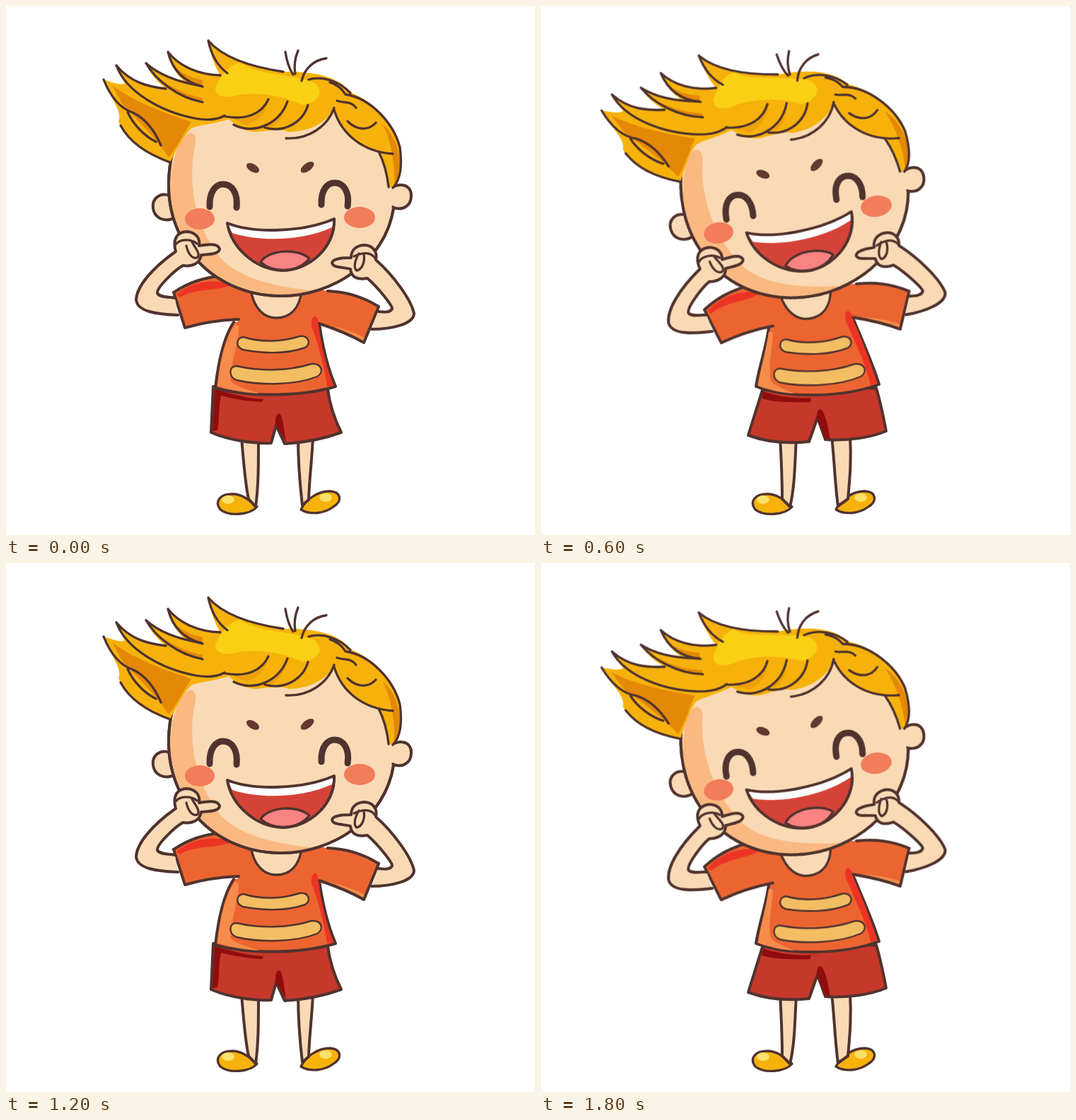
Animation, 748 px wide and 748 px high, one loop 2 s. Source, as an HTML page:

```html
<!DOCTYPE html>
<html lang="en">
<head>
<meta charset="utf-8">
<title>Happy boy</title>
<style>
html, body { margin: 0; width: 100%; height: 100%; overflow: hidden; background: #fff; }
svg { display: block; width: 100vw; height: 100vh; }
.line { fill: none; stroke: #50332e; stroke-width: 4; stroke-linecap: round; stroke-linejoin: round; }
.thin { stroke-width: 3.3; }
.fine { stroke-width: 2.4; }
.bold { stroke-width: 9; }
.flat { stroke: none; }
.skin { fill: #fadab5; }
.glow { fill: #fab981; }
.hair { fill: #f6b20b; }
.gold { fill: #fad014; }
.amber { fill: #e48806; }
.honey { fill: #eea008; }
.shirt { fill: #ec6531; }
.peach { fill: #f68b4b; }
.red { fill: #ec3425; }
.band { fill: #f3bd62; }
.shorts { fill: #c6382a; }
.wine { fill: #8f0e0d; }
.cheek { fill: #f17d5a; }
.brow { fill: #63392f; }
.tilt, .left, .right, .bands { animation: 400ms step-end infinite; }
.tilt { animation-name: tilt; }
.bands { animation-name: bands; }
.left { animation-name: left; }
.right { animation-name: right; }
@keyframes tilt {
  0% { transform: none; }
  50%, 100% { transform: translate(-67px, 67px) rotate(-9.1deg); }
}
@keyframes bands {
  0% { transform: none; }
  50%, 100% { transform: translate(-4px, 14px) rotate(-1.8deg); }
}
@keyframes left {
  0% { visibility: visible; }
  50%, 100% { visibility: hidden; }
}
@keyframes right {
  0% { visibility: hidden; }
  50%, 100% { visibility: visible; }
}
</style>
</head>
<body>
<svg viewBox="0 0 748 748">
<g class="line">
  <!-- shoes -->
  <path class="hair thin" d="M355 708C345 720 315 722 303 712C294 700 303 690 320 690C335 690 345 700 355 708Z"/>
  <path class="hair thin" d="M417 712C424 698 440 686 458 686C474 687 476 700 463 708C450 718 430 720 417 712Z"/>
  <g class="flat" fill="#fbe06a">
    <ellipse cx="314" cy="698" rx="9" ry="6"/>
    <ellipse cx="452" cy="695" rx="9" ry="6"/>
  </g>

  <!-- legs, shorts and torso, one set per lean -->
  <g class="left">
    <path class="skin" d="M333 610C336 645 338 675 343 697L353 708C357 680 357 650 357 610"/>
    <path class="skin" d="M413 610C413 645 416 680 419 706L428 698C429 665 433 640 434 608"/>
    <path class="shorts" d="M293 538L290 603C315 614 350 619 375 618L382 593L394 619C425 617 455 610 474 603C465 585 458 565 455 542Z"/>
    <path class="wine flat" d="M295 541C320 550 345 555 364 556L362 560C340 559 325 556 304 551C300 570 302 588 299 600L292 601Z"/>
    <path class="wine flat" d="M381 592C380 580 384 574 388 577C393 588 393 602 396 616Z"/>
    <path class="shirt" d="M322 447C308 468 300 505 296 540C345 554 420 552 466 538C454 510 447 478 443 449"/>
    <path class="peach flat" d="M324 450C309 470 302 505 299 537C320 544 340 547 358 548C340 542 325 538 318 531C314 515 330 480 329 450Z"/>
    <path class="red flat" d="M433 455C432 434 442 434 442 450C445 480 453 510 463 537L454 538C450 510 442 480 433 455Z"/>
  </g>
  <g class="right">
    <path class="skin" d="M338 610C340 645 341 675 341 697L352 708C359 680 359 645 361 610"/>
    <path class="skin" d="M411 608C415 645 416 680 420 707L434 697C437 665 439 640 437 608"/>
    <path class="shorts" d="M313 543L293 607C320 617 350 619 379 616L391 582L402 613C430 615 465 611 488 601C484 580 480 560 474 540Z"/>
    <path class="wine flat" d="M314 545C335 552 360 556 382 554L381 560C355 561 330 560 312 555Z"/>
    <path class="wine flat" d="M390 584C389 573 393 568 397 571C404 582 406 597 409 612L402 612Z"/>
    <path class="shirt" d="M322 455C318 485 307 515 304 538C350 556 430 553 478 535C469 505 453 470 441 441"/>
    <path class="peach flat" d="M322 461C318 488 310 515 307 537C325 544 342 547 358 548C342 541 328 536 325 529C320 510 328 480 328 459Z"/>
    <path class="red flat" d="M432 448C430 428 440 428 442 446C453 470 467 505 475 534L466 536C460 508 444 475 432 448Z"/>
  </g>

  <!-- upper shirt and neck -->
  <g class="tilt">
    <path class="shirt flat" d="M237 405C260 390 278 385 300 382L455 403C482 404 506 412 527 425L506 476C487 465 464 456 443 449L430 456L325 452L329 443C302 444 277 448 253 455Z"/>
    <path class="red flat" d="M241 408C260 391 292 384 320 394C300 404 268 398 246 412Z"/>
    <path class="red flat" d="M432 455C430 435 441 434 442 449L439 460Z"/>
    <path class="peach flat" d="M449 450C470 453 492 461 509 470L506 475C488 464 468 456 449 450Z"/>
    <path d="M329 443C302 444 277 448 253 455L237 405C260 390 278 385 300 382M455 403C482 404 506 412 527 425L506 476C487 465 464 456 443 449"/>
    <path class="skin thin" d="M346 400C350 428 365 441 382 441C400 441 414 430 418 404"/>
  </g>
  <g class="bands fine">
    <path class="band" d="M336 468C360 476 390 475 415 467C428 465 432 478 423 483C395 493 360 491 335 486C324 482 325 469 336 468Z"/>
    <path class="band" d="M326 509C360 517 400 516 432 506C447 505 450 518 440 524C410 536 360 537 326 529C314 524 315 509 326 509Z"/>
  </g>

  <g class="tilt">
    <!-- ears and face -->
    <path class="skin" d="M231 268C218 263 206 272 208 286C210 300 223 305 235 301"/>
    <path class="skin" d="M541 260C555 248 573 252 573 268C573 285 558 290 546 284"/>
    <ellipse class="skin flat" cx="389" cy="258" rx="159" ry="152"/>
    <path id="jaw" class="skin" d="M235 208C222 268 235 315 264 352C292 388 338 410 389 410C462 410 536 362 548 286"/>
    <path class="glow flat" d="M262 180C248 178 234 215 232 255C233 300 250 335 285 371C325 405 390 417 440 403C385 398 330 386 303 356C266 310 256 245 268 195C269 186 267 181 262 180Z"/>
    <path d="M235 208C222 268 235 315 264 352C292 388 338 410 389 410C462 410 536 362 548 286"/>

    <!-- hair -->
    <g class="flat">
      <path class="hair" d="M138 104C145 106 158 112 168 110L156 84C176 108 200 114 226 117C212 106 203 94 198 81C212 95 232 105 250 105C240 95 232 82 229 65C244 84 270 94 303 98C294 84 289 66 286 49C306 72 345 86 392 93C430 92 470 98 487 122C520 135 548 165 557 200C561 230 556 248 547 257L541 256C540 238 534 220 527 206C500 202 474 175 464 147C452 164 430 178 400 178C385 173 375 176 355 178C335 178 325 168 315 160C290 168 272 168 262 173C250 184 242 203 232 221C200 210 172 195 159 163C165 150 150 135 138 104Z"/>
      <path class="amber" d="M150 112C175 132 215 148 262 164C251 180 243 198 230 214C215 190 185 160 165 140Z"/>
      <path class="amber" d="M236 84C250 97 264 102 278 105L277 114C260 110 246 100 236 84Z"/>
      <path class="amber" d="M204 91C220 108 250 125 278 130L278 137C248 130 220 112 204 91Z"/>
      <path class="amber" d="M533 168C546 178 556 200 557 220C557 240 553 250 549 255C550 225 546 195 533 168Z"/>
      <path class="gold" d="M296 115C304 98 316 82 332 80C348 96 400 96 435 108C450 120 445 135 420 140C390 125 345 120 320 128C305 130 295 125 296 115Z"/>
      <path class="honey" d="M322 160C345 158 362 148 370 134C368 150 358 162 340 168Z"/>
      <path class="honey" d="M350 172C375 168 390 152 397 138C395 155 385 168 370 174Z"/>
    </g>
    <g class="thin">
      <path d="M138 104C146 124 158 144 180 151C198 160 211 178 219 197M172 150C180 168 196 184 212 192M162 169C176 195 204 211 232 221"/>
      <path d="M156 84C176 108 200 114 226 117M156 84C170 122 220 150 268 159C286 162 299 161 309 155"/>
      <path d="M198 81C212 105 242 129 278 136M198 81C218 99 246 108 276 113"/>
      <path d="M229 65C236 93 254 108 278 114M229 65C244 84 270 97 303 98"/>
      <path d="M286 49C290 68 298 84 313 95M286 49C306 72 345 86 392 93"/>
      <path d="M309 156C340 162 362 152 371 132M322 168C350 182 386 168 398 135M366 172C394 180 420 164 427 140M396 187C428 189 455 170 464 144"/>
      <path d="M428 104C448 98 472 107 487 123M458 108C470 112 476 118 480 125C515 130 548 165 557 200C561 230 556 248 547 257"/>
      <path d="M464 147C474 180 503 206 547 209M527 206C535 222 539 238 541 256M468 134C480 138 488 134 495 144M483 163C498 178 514 175 523 165"/>
      <path d="M395 65C397 78 400 88 406 97M413 63C408 75 407 85 409 96M453 74C436 76 422 88 418 106"/>
    </g>

    <!-- features -->
    <g class="flat">
      <ellipse class="brow" cx="349" cy="229" rx="10" ry="5.5" transform="rotate(30 349 229)"/>
      <ellipse class="brow" cx="426" cy="228" rx="11" ry="5.5" transform="rotate(-36 426 228)"/>
      <ellipse class="cheek" cx="274" cy="301" rx="21" ry="15"/>
      <ellipse class="cheek" cx="500" cy="299" rx="22" ry="15"/>
    </g>
    <path class="bold" d="M288 284C287 262 297 252 307 252C320 252 328 265 326 285M446 281C445 259 455 250 465 250C478 250 486 264 483 283"/>
    <path class="flat" fill="#d54338" d="M313 307C350 322 420 320 464 301C466 340 430 374 390 374C350 372 318 340 313 307Z"/>
    <path class="thin" fill="#f98282" d="M360 362C372 344 412 342 429 357C412 378 378 378 360 362Z"/>
    <path class="flat" fill="#fff" d="M313 307C350 322 420 320 464 301L461 313C420 332 360 334 320 321Z"/>
    <path d="M313 307C350 322 420 320 464 301C466 340 430 374 390 374C350 372 318 340 313 307Z"/>

    <!-- arms and hands -->
    <path class="skin" d="M243 437C213 436 185 432 184 415C185 397 205 372 240 347C235 330 242 319 256 319C268 320 275 328 273 339C285 337 299 335 302 343C302 351 288 351 276 352C274 364 264 369 250 367C238 374 213 398 214 406C217 412 228 411 239 413"/>
    <path class="thin" d="M240 337C246 329 262 329 270 336M263 334C268 342 276 352 270 356C262 358 257 348 255 339"/>
    <path class="skin" d="M517 457C545 457 576 450 577 435C573 415 547 380 523 359C526 346 517 338 506 338C494 339 488 346 488 356C478 356 463 356 461 363C462 371 478 369 487 372C488 382 495 388 511 385C526 398 546 423 546 428C543 434 535 433 526 432"/>
    <path class="thin" d="M523 358C517 348 507 347 492 354M499 350C493 360 491 371 496 374C503 373 508 362 506 351"/>
  </g>
</g>
</svg>
</body>
</html>
```
